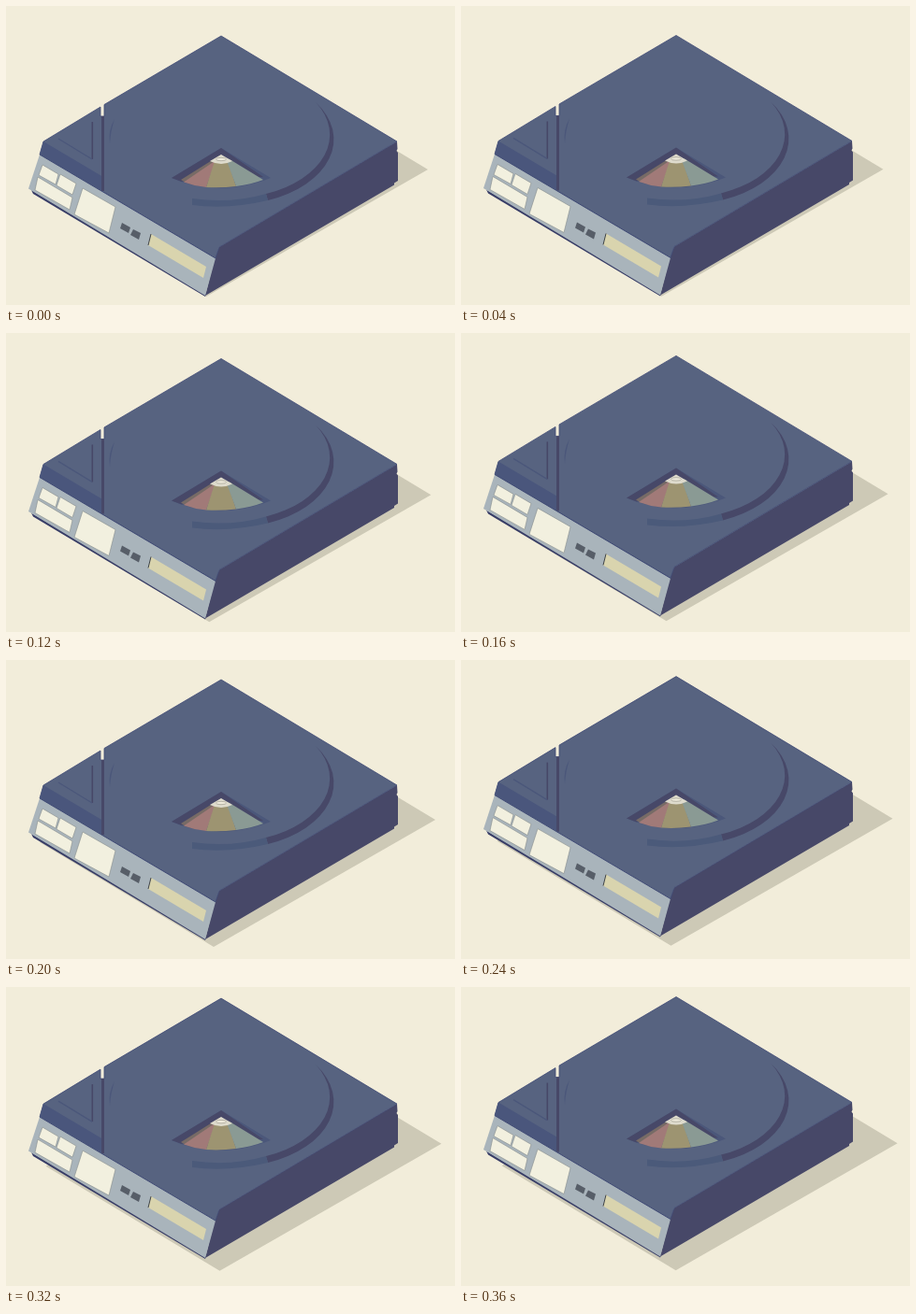
An HTML page that plays this animation: 480x320 px, repeating every 0.4 s.

```html
<!DOCTYPE html>
<html lang="en">
<meta charset="utf-8">
<title>Floating disc player</title>
<style>
  html, body { margin: 0; width: 100%; height: 100%; overflow: hidden; background: #f2edda; }
  svg { display: block; width: 480px; height: 320px; }
</style>
<svg viewBox="0 0 480 320">
  <path id="shadow" fill="#cdc9b6" d="M28 199 214 311 451 175 265 63Z"/>
  <g id="player">
    <path fill="#373c66" d="M27 197 29 201 213 311 214 308Z"/>
    <path fill="#474868" d="M228 258 418 145 418.5 153 417.5 155 419 157V187L415 189.500V191.500L213 310 223 270Z"/>
    <path fill="#576380" stroke="#404b75" stroke-width=".8" d="M230 32 418 145 228 258 224 270 36 159 40 145 101 108V118H105V105.500Z"/>
    <path fill="#4a567c" d="M40 145 104 183V199L36 159Z"/>

    <!-- lid grooves -->
    <g fill="none" stroke="#474868">
      <path stroke-width="3" d="M103.500 118V198"/>
      <path stroke-width="1.600" d="M92.300 124V164"/>
      <path stroke="#4b577a" stroke-width="1.400" d="M56 142 92 164"/>
    </g>
    <path fill="#4b577a" d="M116 121Q109 133 111 147 112 133 116 121Z"/>
    <path fill="#474868" d="M331 103A110 70 0 0 1 280 208L278 201A108 68 0 0 0 331 103Z"/>
    <path fill="#4b5a7a" d="M278 201Q240 212 199 206V213Q238 218 280 208Z"/>

    <!-- disc window -->
    <path fill="#4b577a" d="M230 152 283 184 275 187Q230 202 187 188L177 184Z"/>
    <path fill="#474868" d="M230 152 177 184 188 188 230 160 270 183 275 183Z"/>
    <path fill="#776b66" d="M230 159 187 186 192 189 230 166Z"/>
    <path fill="#a17a78" d="M226 164 190 188.500Q202 193 214 194L224 166Z"/>
    <path fill="#9d9471" d="M223 166 214 194Q230 195 246 193L237 166Z"/>
    <path fill="#8a9a94" d="M235 163 246 193Q262 191 275 186L239 164Z"/>
    <path fill="#dedbcd" d="M230 159 242 166Q230 172 218 166Z"/>
    <ellipse cx="230" cy="164" rx="5.500" ry="1.700" fill="#eeeadb" stroke="#aaa79b" stroke-width=".8"/>

    <!-- front panel -->
    <path fill="#a9b4bb" d="M36 159 224 270 213 310 24 195.500Z"/>
    <path fill="none" stroke="#404b75" d="M36 159 224 270"/>
    <g fill="#f2f0df" stroke="#858b8c" stroke-width=".6">
      <path d="M39 170 56 180 53 191 35 181Z"/>
      <path d="M58 180 75 190 71 202 54 192Z"/>
      <path d="M34 183 71 205 68 218 31 197Z"/>
      <path d="M82 195 117 215 110 243 73 223Z"/>
    </g>
    <path fill="#575e68" d="M124 232 133 237 131 243 122 238ZM136 239 144 243 142 250 133 245Z"/>
    <path fill="#d9d4ae" d="M155 244 214 279 211 291 152 256Z"/>
    <path stroke="#404448" d="M155 244 152 256"/>
  </g>
</svg>
<script>
  const LOOP = 400, STEP = 40, LIFT = 22;
  const player = document.getElementById('player');
  const shadow = document.getElementById('shadow');

  function draw() {
    const time = Math.floor(performance.now() % LOOP / STEP) * STEP;
    const rise = (1 - Math.cos(Math.PI * time / LOOP)) / 2;
    player.setAttribute('transform', `translate(0 ${-LIFT * rise})`);
    shadow.setAttribute('transform', `translate(${16 * rise} ${-8 * rise})`);
    requestAnimationFrame(draw);
  }
  draw();
</script>
</html>
```
